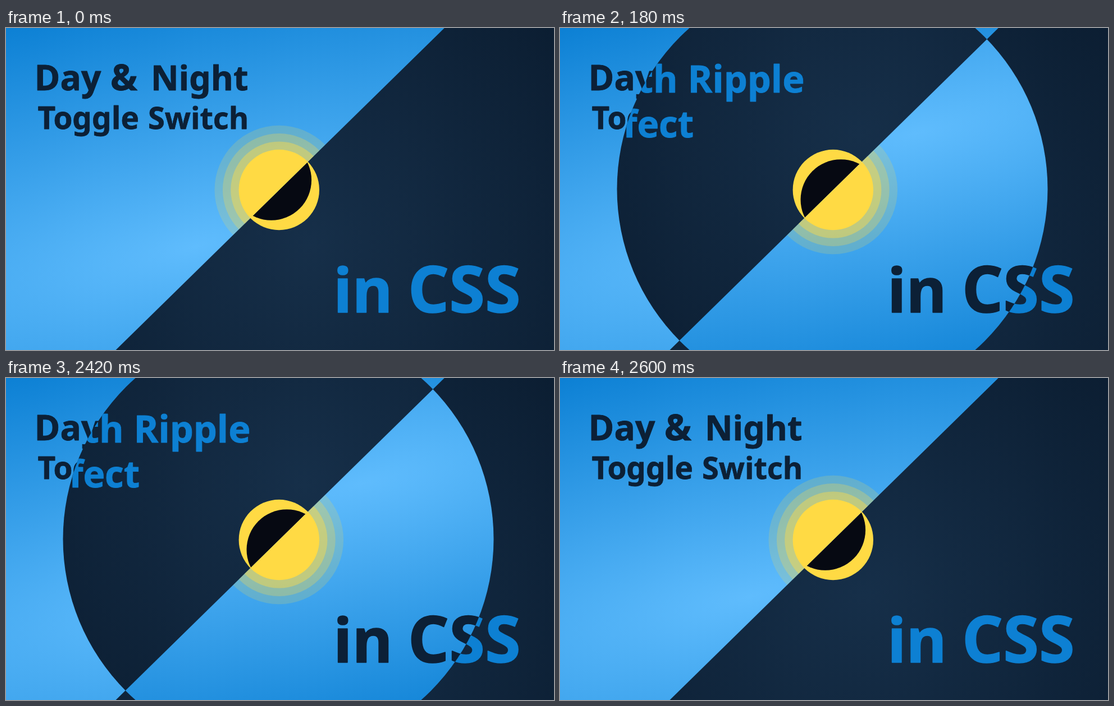
Recreate the animation shown at these times as an HTML page with a canvas. Size 976 px wide and 574 px high, loop 4.32 s.

```html
<!DOCTYPE html>
<html lang="en">
<head>
<meta charset="utf-8">
<title>Day and night toggle</title>
<style>
html, body { margin: 0; width: 100%; height: 100%; overflow: hidden; background: #0d2035; }
canvas { display: block; }
</style>
</head>
<body>
<canvas id="stage" width="976" height="574"></canvas>
<script>
const W = 976, H = 574, LOOP = 4320, STEP = 20, STEPS = 14;
const DARK = '#0c2036', BLUE = '#0d80d3', YELLOW = '#ffda44', BLACK = '#060912';
const SUN = { x: 486.3, y: 288.5, r: 71.7 };
const ctx = document.getElementById('stage').getContext('2d');

// word, x, baseline, size
const DAY_TITLE = [
  ['Day', 50.6, 110.5, 62], ['&', 186, 110.5, 64], ['Night', 258, 110.5, 61],
  ['Toggle', 56.5, 179.5, 54.8], ['Switch', 253, 179.5, 54]
];
const RIPPLE_TITLE = [
  ['With', 52.5, 114.5, 66.5], ['Ripple', 227.5, 114.5, 66.5], ['Effect', 50, 194.5, 65.5]
];
const CSS_TITLE = [['in', 583, 506.5, 110], ['CSS', 715.8, 506.5, 115.5]];

function disc(x, y, r, fill) {
  ctx.beginPath();
  ctx.arc(x, y, r, 0, 2 * Math.PI);
  ctx.fillStyle = fill;
  ctx.fill();
}

function glow(x, y, r, inner, outer) {
  const g = ctx.createRadialGradient(x, y, 0, x, y, r);
  g.addColorStop(0, inner);
  g.addColorStop(1, outer);
  return g;
}

// a thin outline makes the letters a little heavier
function write(words, color) {
  ctx.fillStyle = ctx.strokeStyle = color;
  ctx.lineJoin = 'round';
  for (const [word, x, y, size] of words) {
    ctx.font = `bold ${size}px "Noto Sans", "Open Sans", sans-serif`;
    ctx.lineWidth = size * 0.014;
    ctx.fillText(word, x, y);
    ctx.strokeText(word, x, y);
  }
}

// side: 1 puts night at the lower right, -1 at the upper left
function scene(side, title) {
  ctx.fillStyle = side > 0
    ? glow(540, 385, 610, '#162f49', '#0b1d31')
    : glow(530, 190, 610, '#162f49', '#0b1d31');
  ctx.fillRect(0, 0, W, H);
  disc(SUN.x, SUN.y, SUN.r, YELLOW);
  disc(SUN.x - side * 13.9, SUN.y - side * 17.4, SUN.r, BLACK);

  ctx.save();
  const edge = side > 0 ? 0 : W;
  ctx.beginPath();
  ctx.moveTo(780.8, 0);
  ctx.lineTo(195.5, H);
  ctx.lineTo(edge, H);
  ctx.lineTo(edge, 0);
  ctx.clip();

  // the sky is a wide, tilted ellipse of light
  ctx.save();
  ctx.translate(SUN.x - side * 148, SUN.y + side * 101);
  ctx.rotate(-Math.PI / 15);
  ctx.scale(1500, 458);
  ctx.fillStyle = glow(0, 0, 1, '#5fbcfd', '#0c80d4');
  ctx.fillRect(-2, -2, 4, 4);
  ctx.restore();

  disc(SUN.x, SUN.y, 114.8, 'rgba(255,218,68,.18)');
  disc(SUN.x, SUN.y, 100.4, 'rgba(255,218,68,.27)');
  disc(SUN.x, SUN.y, 86.1, 'rgba(255,218,68,.43)');
  disc(SUN.x, SUN.y, SUN.r, YELLOW);
  ctx.restore();

  write(title, side > 0 ? DARK : BLUE);
  write(CSS_TITLE, side > 0 ? BLUE : DARK);
}

// cubic-bezier(.42, 0, .58, 1)
function easeInOut(t) {
  let lo = 0, hi = 1;
  for (let i = 0; i < 30; i++) {
    const s = (lo + hi) / 2, q = 1 - s;
    if (1.26 * q * q * s + 1.74 * q * s * s + s * s * s < t) lo = s;
    else hi = s;
  }
  return lo * lo * (3 - 2 * lo);
}

function rippleStep(time) {
  const open = Math.floor(time / STEP);
  const close = Math.floor((time - 2320) / STEP);
  return Math.max(0, Math.min(STEPS, open, STEPS - close));
}

function draw(time) {
  const step = rippleStep(time);
  if (step < STEPS) scene(1, DAY_TITLE);
  if (step > 0) {
    ctx.save();
    if (step < STEPS) {
      ctx.beginPath();
      ctx.arc(485, 287, 574 * easeInOut(step / 15), 0, 2 * Math.PI);
      ctx.clip();
    }
    scene(-1, RIPPLE_TITLE);
    ctx.restore();
  }
}

let start;
function tick(now) {
  start ??= now;
  draw((now - start) % LOOP);
  requestAnimationFrame(tick);
}
draw(0);
requestAnimationFrame(tick);
</script>
</body>
</html>
```
